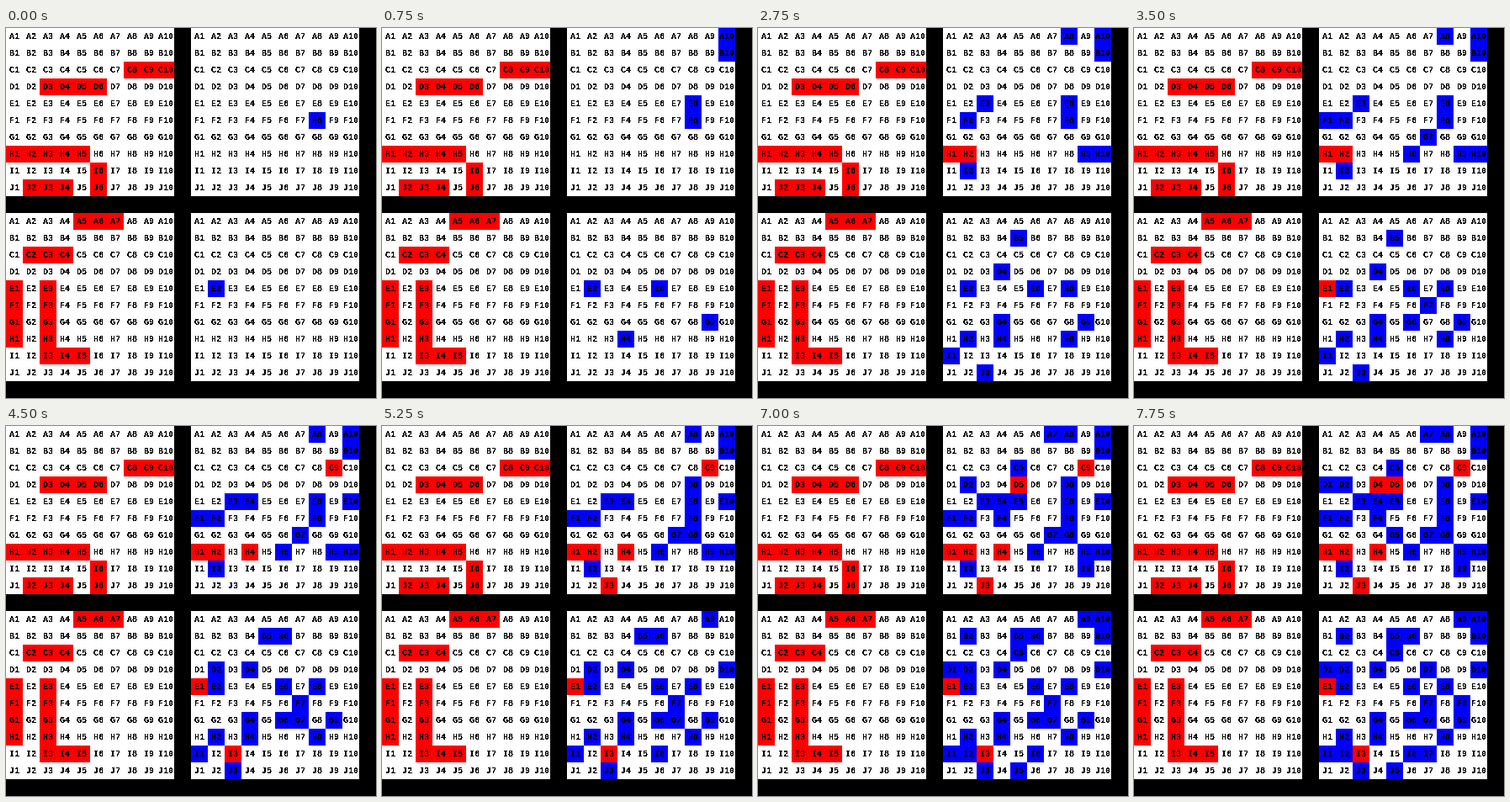
An HTML page with a canvas for the animation above (8000 ms loop, 440x440 px).

```html
<!DOCTYPE html>
<html lang="en">
<head>
<meta charset="utf-8">
<title>Two fleets</title>
<style>
html, body { margin: 0; width: 100%; height: 100%; overflow: hidden; background: #000; }
canvas { display: block; width: 440px; height: 440px; }
</style>
</head>
<body>
<canvas id="stage" width="440" height="440"></canvas>
<script>
const CELL = 20, SIZE = 10, BOARD = CELL * SIZE, STEP = 250, LOOP = 8000;
const RED = '#f00', BLUE = '#00f';
const ctx = document.getElementById('stage').getContext('2d');

const sides = [
  {
    y: 0,
    ships: 'C8 C9 C10 D3 D4 D5 D6 H1 H2 H3 H4 H5 I6 J6 J2 J3 J4'.split(' '),
    shots: ('F8 A10 B10 E8 E3 H10 A8 F2 H2 I2 H9 H1 G7 F1 H6 E10 ' +
            'C9 E4 H4 G8 D8 J3 E5 F4 D5 I9 A7 C5 D2 D4 G5 D1').split(' ')
  },
  {
    y: BOARD + CELL,
    ships: 'A5 A6 A7 C2 C3 C4 E1 F1 G1 H1 E3 F3 G3 H3 I3 I4 I5'.split(' '),
    shots: ('E2 E6 G9 H4 D4 H8 E8 G4 I1 J3 B5 H2 E1 F7 G6 B6 ' +
            'G7 D2 I3 D10 I6 A9 C5 D1 I2 J5 A10 B2 B10 D7 I7 F9').split(' ')
  }
];

// The labels are drawn once with hard edges and shared by all boards.
function makeLabels() {
  const sheet = document.createElement('canvas');
  sheet.width = sheet.height = BOARD;
  const pen = sheet.getContext('2d');
  pen.font = 'bold 10px "Liberation Mono", "Courier New", monospace';
  for (let row = 0; row < SIZE; row++) {
    for (let col = 0; col < SIZE; col++) {
      const label = 'ABCDEFGHIJ'[row] + (col + 1);
      pen.fillText(label, col * CELL + 10 - label.length * 3, row * CELL + 13);
    }
  }
  const image = pen.getImageData(0, 0, BOARD, BOARD);
  for (let i = 3; i < image.data.length; i += 4) {
    image.data[i] = image.data[i] > 105 ? 255 : 0;
  }
  pen.putImageData(image, 0, 0);
  return sheet;
}

const labels = makeLabels();

function drawBoard(x, y, cells, colorOf) {
  ctx.fillStyle = '#fff';
  ctx.fillRect(x, y, BOARD, BOARD);
  for (const cell of cells) {
    const col = Number(cell.slice(1)) - 1;
    const row = cell.charCodeAt(0) - 65;
    ctx.fillStyle = colorOf(cell);
    ctx.fillRect(x + col * CELL, y + row * CELL, CELL, CELL);
  }
  ctx.drawImage(labels, x, y);
}

function draw() {
  const turn = Math.floor((performance.now() % LOOP) / STEP);
  ctx.fillStyle = '#000';
  ctx.fillRect(0, 0, 440, 440);
  for (const { y, ships, shots } of sides) {
    drawBoard(0, y, ships, () => RED);
    drawBoard(BOARD + CELL, y, shots.slice(0, turn + 1),
      cell => ships.includes(cell) ? RED : BLUE);
  }
  requestAnimationFrame(draw);
}

draw();
</script>
</body>
</html>
```
